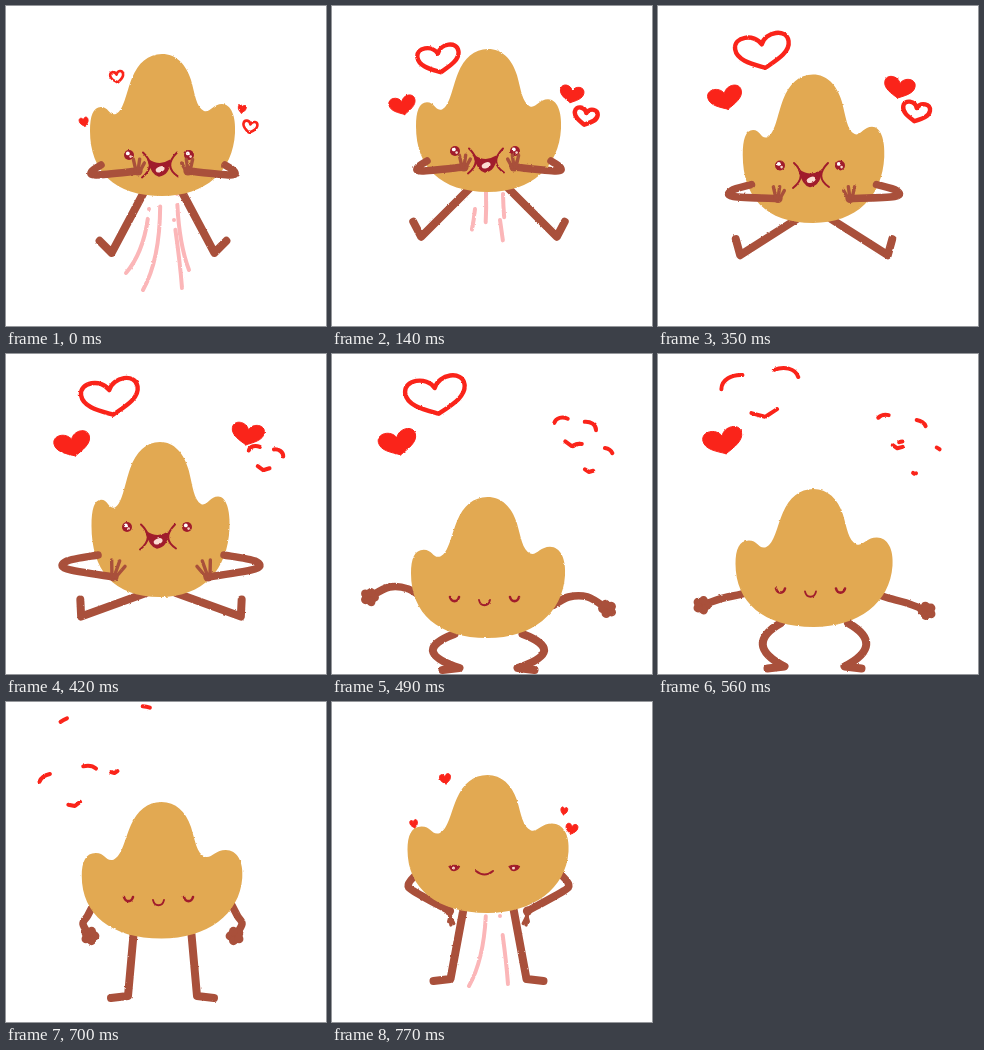
Recreate the animation shown at these times as an HTML page. Size 320x320 px, loop 840 ms.

```html
<!DOCTYPE html>
<html lang="en">
<head>
<meta charset="utf-8">
<title>Happy jump</title>
<style>
html, body { margin: 0; width: 100%; height: 100%; overflow: hidden; background: #fff; }
svg { display: block; width: 100vw; height: 100vh; }
</style>
</head>
<body>
<svg viewBox="0 0 320 320">
  <filter id="crayon" filterUnits="userSpaceOnUse" x="0" y="0" width="320" height="320" color-interpolation-filters="sRGB">
    <feTurbulence type="fractalNoise" baseFrequency=".35" numOctaves="2" seed="4" result="n"/>
    <feDisplacementMap in="SourceGraphic" in2="n" scale="2" xChannelSelector="R" yChannelSelector="G"/>
  </filter>
  <g id="scene" filter="url(#crayon)" stroke-linecap="round" stroke-linejoin="round"></g>
</svg>
<script>
const STEP = 70, STEPS = 12;
const SKIN = '#e2a952', LIMB = '#a9503b', DARK = '#a01c2c', RED = '#fa241a', PINK = '#fbb6b8';
const scene = document.getElementById('scene');

// Left arm from shoulder to wrist, measured from the middle of the eye line.
// Arms with fingers have a reach and a turn; the others end in a fist.
const CHEEK = { pts: [[-62, 10], [-71, 16], [-67, 20], [-25, 16]], reach: 12, turn: 0 };
const OPEN = { pts: [[-63, 28], [-94, 34], [-94, 42], [-47, 50]], reach: 17, turn: .2 };
const FLY = { pts: [[-65, 3], [-80, -6], [-99, -7], [-119, 4]] };
const DOWN = { pts: [[-65, 3], [-70, 18], [-84, 27], [-106, 31]] };
const HIPS = { pts: [[-72, 6], [-80, 16], [-75, 23], [-39, 43]], reach: 14, turn: 2.9 };

// Legs swing freely by an angle in the air, or stand on given ankles.
const POSES = [
  { at: 0, mid: 157, top: 48, w: 145, h: 142, eye: 149, hip: 19, swing: 28, arm: CHEEK, mood: 'joy' },
  { at: 2, mid: 157, top: 43, w: 145, h: 143, eye: 145, hip: 19, swing: 45, arm: CHEEK, mood: 'joy' },
  { at: 4, mid: 157, top: 49, w: 145, h: 142, eye: 146, hip: 19, swing: 45, arm: CHEEK, mood: 'joy' },
  { at: 6, mid: 155, top: 88, w: 138, h: 155, eye: 173, hip: 15, swing: 70, arm: OPEN, mood: 'joy' },
  { at: 7, mid: 156.5, top: 143, w: 154, h: 141, eye: 245, hip: 34, ankle: [-29, 314], arm: FLY, lean: .05, mood: 'calm' },
  { at: 9, mid: 156.5, top: 127, w: 160, h: 135, eye: 228, hip: 33, ankle: [-31, 311], arm: DOWN, mood: 'calm' },
  { at: 11, mid: 156.5, top: 73, w: 161, h: 138, eye: 166, hip: 25, ankle: [-38, 277], arm: HIPS, mood: 'smile' }
];

// Each heart grows and drifts from one place to another, then pops.
const HEARTS = [
  { from: [111, 71, 13], to: [104, 42, 60], tilt: -9, open: true, pop: 8 },
  { from: [78, 116, 9], to: [66, 89, 38], tilt: -13, pop: 9 },
  { from: [236, 103, 8], to: [242, 79, 34], tilt: 10, pop: 7 },
  { from: [244, 121, 14], to: [260, 104, 29], tilt: 10, open: true, pop: 6 }
];

const STREAKS = [
  'M154 186Q156 250 137 284', 'M143 203Q139 245 120 267',
  'M168 214Q174 255 176 282', 'M171 188Q172 235 183 264'
];

const mix = (a, b, t) => Array.isArray(a) ? a.map((v, i) => mix(v, b[i], t)) : a + (b - a) * t;
const path = (d, fill, stroke = 'none', w = 0, extra = '') =>
  `<path d="${d}" fill="${fill}" stroke="${stroke}" stroke-width="${w}" ${extra}/>`;
const line = (d, color, w, extra) => path(d, 'none', color, w, extra);
const dot = (x, y, r, fill) => `<circle cx="${x}" cy="${y}" r="${r}" fill="${fill}"/>`;
const shift = (x, y, inner) => `<g transform="translate(${x} ${y})">${inner}</g>`;
const pair = (mid, y, lean, inner) => [1, -1].map(side =>
  `<g transform="matrix(${side} ${side * lean} 0 1 ${mid} ${y})">${inner}</g>`).join('');

// Turns a pose into plain numbers that can be blended.
function layout({ mid, top, w, h, eye, hip, swing, ankle, arm, lean = 0 }) {
  const start = [-hip, top + h - 4];
  let toe;
  if (ankle) {
    toe = [ankle[0] - 17, ankle[1] + 2];
  } else {
    const a = swing * Math.PI / 180, b = a + .3;
    ankle = [start[0] - 69 * Math.sin(a), start[1] + 69 * Math.cos(a)];
    toe = [ankle[0] - 17 * Math.cos(b), ankle[1] - 17 * Math.sin(b)];
  }
  return [mid, top, w, h, eye, lean, [start, ankle, toe], arm.pts];
}

// The knee bends outwards when the hip comes near the ankle.
function leg([hip, ankle, toe]) {
  const d = Math.hypot(ankle[0] - hip[0], ankle[1] - hip[1]);
  const bend = Math.sqrt(Math.max(0, 3500 - d * d));
  return line(`M${hip}Q${(hip[0] + ankle[0]) / 2 - bend} ${(hip[1] + ankle[1]) / 2} ${ankle}L${toe}`, LIMB, 8);
}

function arm(pts, { reach, turn }) {
  const pt = i => pts[Math.max(0, Math.min(3, i))];
  let d = `M${pts[0]}`;
  for (let i = 0; i < 3; i++) {
    const [a, b, c, e] = [pt(i - 1), pt(i), pt(i + 1), pt(i + 2)];
    d += `C${b.map((v, j) => v + (c[j] - a[j]) / 6)} ${c.map((v, j) => v - (e[j] - b[j]) / 6)} ${c}`;
  }
  let hand = dot(0, 0, reach ? 4.6 : 7.5, LIMB);
  for (let i = 0; reach && i < 3; i++) {
    const a = turn + .36 * i - .22, r = reach - Math.max(0, i - 1) * 3;
    hand += line(`M${2 * i - 2} 0L${2 * i - 2 + r * Math.sin(a)} ${-r * Math.cos(a)}`, LIMB, 3.4);
  }
  for (let a = 0; !reach && a < 6; a += 1.26) hand += dot(5 * Math.cos(a), 5 * Math.sin(a), 4.4, LIMB);
  return line(d, LIMB, 7.5) + shift(...pts[3], hand);
}

// Squash widens the outer horns and leaves the peak as it is.
function body(mid, top, w, h) {
  const d = ('M156 48C170 48 180 58 185 74C189 88 190 101 198 105C204 107 207 98 216 98' +
    'C225 98 230 110 229 127C227 165 200 190 156 190C108 190 84 165 84 125' +
    'C84 110 87 101 95 101C103 101 103 110 110 108C118 104 120 87 126 72C132 57 142 48 156 48Z')
    .replace(/(\d+) (\d+)/g, (_, x, y) => {
      const dx = x - 156.5;
      return `${mid - .5 + dx + (w - 145) / 2 * (dx / 72.5) ** 3} ${top + (y - 48) * h / 142}`;
    });
  return path(d, SKIN);
}

function face(mid, eyeY, mood) {
  let eye, mouth, drop;
  if (mood === 'joy') {
    drop = 11.5;
    eye = dot(0, 0, 5, DARK) + dot(-1.2, -1.6, 1.9, '#fff') + dot(1.6, 1.6, 1.3, '#f6d3c4');
    mouth = line('M-16 -14Q-2 -1 -17 11M18 -14Q4 0 19 10', DARK, 2) +
      path('M-11 -7Q0 1 11 -6Q10 8 0 9.5Q-7 8 -11 -7Z', DARK, DARK, 1.5) +
      '<ellipse cx="0" cy="3" rx="4.6" ry="2.8" fill="#fbdcd2" transform="rotate(-22)"/>';
  } else if (mood === 'calm') {
    drop = 3;
    eye = line('M-4.5 -2C-3 3.5 3 3.5 4.5 -2', DARK, 2.6);
    mouth = line('M-5.5 -2C-4 5 4 5 5.5 -2', DARK, 1.8);
  } else {
    drop = 5;
    eye = path('M-5.5 -1.5Q0 -4 5 -1.5Q2 4 -3 2Z', DARK, DARK, 1.2) + dot(-1, 0, 1.5, '#f6d3c4');
    mouth = line('M-8.5 -2Q0 5 8.5 -2', DARK, 2);
  }
  const x = mid - 4;
  return shift(x - 30, eyeY, eye) + shift(x + 30, eyeY, eye) + shift(x, eyeY + drop, mouth);
}

function heart(x, y, w, tilt, look) {
  const h = 4 + .53 * w, a = tilt * Math.PI / 180, c = Math.cos(a), s = Math.sin(a);
  const d = 'M0 1C-.45 .65 -1 .3 -1 -.4C-1 -1.2 -.2 -1.2 0 -.45C.2 -1.2 1 -1.2 1 -.4C1 .3 .45 .65 0 1Z'
    .replace(/(-?[\d.]+) (-?[\d.]+)/g, (_, u, v) => {
      const dx = u * w / 2, dy = v * h / 2;
      return `${x + dx * c - dy * s} ${y + dx * s + dy * c}`;
    });
  return path(d, ...look);
}

function hearts(s) {
  return HEARTS.map(({ from, to, tilt, open, pop }) => {
    if (s < 0) {
      const [x, y, w] = from;
      return heart(x + (157 - x) * .05, y + 6, w * .85, tilt, [RED, RED, 1]);
    }
    const age = s - pop + 1;
    const [x, y, w] = mix(from, to, (Math.min(s, pop) / 7) ** .4);
    if (age <= 0) return heart(x, y, w, tilt, open ? ['#fff', RED, w < 20 ? 2.6 : 4.4] : [RED, RED, 1]);
    if (age > 3) return '';
    // Three shrinking arcs fly apart: the two lobes and the tip.
    const dash = 19 - 5.5 * age;
    return heart(x, y, w * (1 + .25 * age), tilt, [open && age === 1 ? '#fff' : 'none', RED, 4,
      `pathLength="99" stroke-dasharray="${dash} ${33 - dash}" stroke-dashoffset="${dash / 2}"`]);
  }).join('');
}

// Speed lines are windows on fixed curves, drawn up towards the body.
function streaks(s) {
  const a = Math.max(0, 14 * (1 - s)), b = Math.min(100, 100 - 35 * s);
  if (b <= a) return '';
  return STREAKS.filter((_, i) => s >= 0 || i % 2 === 0).map(d =>
    line(d, PINK, 4, `pathLength="100" stroke-dasharray="0 ${a} ${b - a} 200"`)
      .replace('stroke-dasharray="0 0 ', 'stroke-dasharray="0 .01 ')).join('');
}

function draw(step) {
  const i = POSES.findLastIndex(p => p.at <= step);
  const pose = POSES[i], next = POSES[i + 1] || pose;
  const t = (step - pose.at) / (next.at - pose.at || 1);
  const [mid, top, w, h, eye, lean, legPts, armPts] = mix(layout(pose), layout(next), t);
  const s = step === STEPS - 1 ? -1 : step;
  const arms = pair(mid, eye, lean, arm(armPts, pose.arm));
  const torso = body(mid, top, w, h) + face(mid, eye, pose.mood);
  scene.innerHTML = hearts(s) + streaks(s) + pair(mid, 0, 0, leg(legPts)) +
    (pose.mood === 'joy' ? torso + arms : arms + torso);
}

const start = performance.now();
let shown = -1;
function tick() {
  const step = Math.floor((performance.now() - start) / STEP) % STEPS;
  if (step !== shown) draw(shown = step);
  requestAnimationFrame(tick);
}
tick();
</script>
</body>
</html>
```
